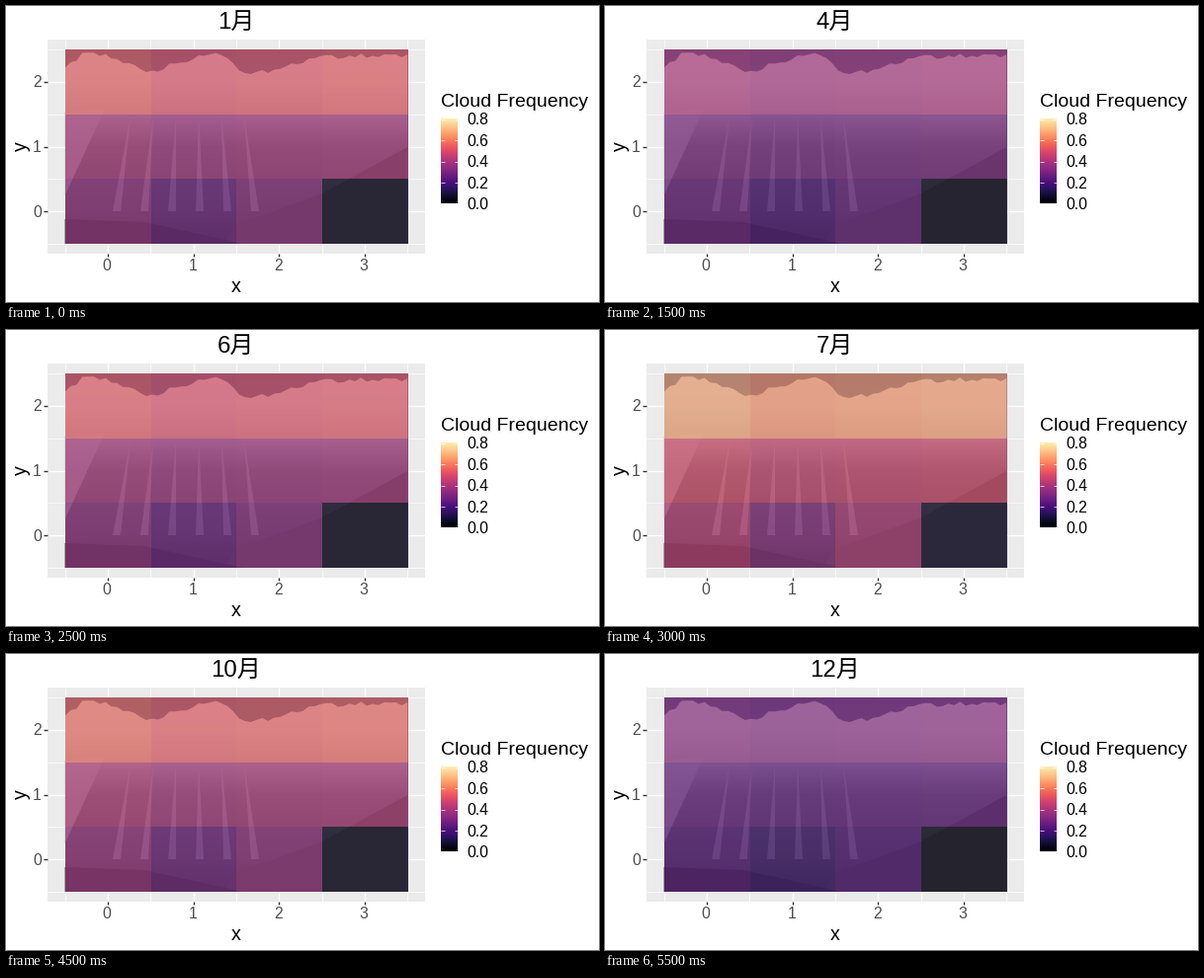
These frames come from a looping animation (600 px wide and 300 px high, 6000 ms). A matplotlib script:

```python
import numpy as np
import matplotlib.pyplot as plt
from matplotlib.animation import FuncAnimation
from matplotlib.colors import LinearSegmentedColormap
from matplotlib.patches import Polygon, Rectangle

W, H, DPI = 600, 300, 100
plt.rcParams["font.family"] = ["Liberation Sans", "Noto Sans CJK JP"]

LEFT, RIGHT, TOP, BOTTOM = 59.6, 406.2, 44, 241
EXTENT = (LEFT, RIGHT, BOTTOM, TOP)
CELL_W, CELL_H = (RIGHT - LEFT) / 4, (BOTTOM - TOP) / 3

# Each month's cloudiness (percent of the scale), spread by terrain:
# peaks gather cloud, the lower right corner stays clear.
MONTHLY = [47, 26, 40, 35, 24, 46, 58, 50, 53, 49, 40, 29]
TERRAIN = np.outer([1.36, 1, 0.87], [1.03, 0.97, 0.99, 1.01])
TERRAIN[2, 3] = 0.15
TERRAIN[2, 1] = 0.68


def gradient(ax, colors, zorder):
    cmap = LinearSegmentedColormap.from_list("tones", colors)
    ramp = np.linspace(0, 1, 200)[:, None]
    return ax.imshow(ramp, cmap=cmap, extent=EXTENT, zorder=zorder)


def line(ax, xs, ys, color, px, zorder=1):
    ax.plot(xs, ys, color=color, lw=px * 72 / DPI, zorder=zorder,
            solid_capstyle="butt")


def label(ax, x, y, text, px, color="black", **kwargs):
    return ax.text(x, y, text, fontsize=px * 72 / DPI, color=color, **kwargs)


def shape(ax, points, color, alpha=1.0):
    patch = Polygon(points, facecolor=color, edgecolor="none", alpha=alpha,
                    zorder=5)
    ax.add_patch(patch)
    return patch


def skyline():
    """Ridge through the main summits, roughened between them."""
    peaks_x = [LEFT, 82, 107, 147, 172, 217, 238, 268, 318, RIGHT]
    peaks_y = [60, 46, 51, 66, 57, 46, 67, 65, 51, 49]
    x = np.linspace(LEFT, RIGHT, 60)
    jitter = np.random.default_rng(4).uniform(-2, 3, x.size)
    return list(zip(x, np.interp(x, peaks_x, peaks_y) + jitter))


def draw_mountains(ax):
    gradient(ax, ["#4b5570", "#686f82"], 3)
    mountain = shape(ax, skyline() + [(RIGHT, BOTTOM), (LEFT, BOTTOM)],
                     "none")
    slope = gradient(ax, ["#c2bfc4", "#bfbcc0", "#aaa6aa", "#777377",
                          "#686569", "#5f5c5e", "#4b4947"], 4)
    slope.set_clip_path(mountain)

    shape(ax, [(LEFT, 108), (100, 104), (LEFT, 192)], "#b5b1b5", 0.7)
    for i in range(6):
        top, foot = 126 + 23 * i, 112 + 28 * i
        shape(ax, [(top, 112), (foot + 4, 208), (foot - 4, 208)],
              "#c2bfc4", 0.45)
    shape(ax, [(233, 222), (320, 190), (RIGHT, 143), (RIGHT, BOTTOM),
               (220, BOTTOM)], "#565350")
    shape(ax, [(LEFT, 216), (140, 219), (240, BOTTOM), (LEFT, BOTTOM)],
          "#423f3d")


def draw_panel(ax):
    ax.add_patch(Rectangle((42, 34), 382, 216.5, color="#ebebeb", lw=0))
    for i in range(9):
        x = LEFT + i * CELL_W / 2
        line(ax, [x, x], [34, 250.5], "white", 1.4 if i % 2 else 0.7)
    for i in range(7):
        y = BOTTOM - i * CELL_H / 2
        line(ax, [42, 424], [y, y], "white", 1.4 if i % 2 else 0.7)
    for i in range(4):
        x = LEFT + (i + 0.5) * CELL_W
        line(ax, [x, x], [250.5, 254.2], "#333333", 1.4)
        label(ax, x - 0.8, 268, str(i), 15.7, "#4d4d4d", ha="center")
    for i in range(3):
        y = BOTTOM - (i + 0.5) * CELL_H
        line(ax, [38.3, 42], [y, y], "#333333", 1.4)
        label(ax, 36, y + 5.6, str(i), 15.7, "#4d4d4d", ha="right")
    label(ax, 232.8, 290, "x", 19.6, ha="center")
    label(ax, 24.5, 142, "y", 19.6, rotation=90, ha="right", va="center")


def draw_legend(ax):
    top, bottom = 114.5, 200.5
    label(ax, 439.6, 102, "Cloud Frequency", 19.5)
    ax.imshow(np.linspace(0.97, 0, 256)[:, None], cmap="magma", vmin=0,
              vmax=1, extent=(440, 457, bottom, top), zorder=3)
    for i in range(5):
        y = bottom - i * (bottom - top) / 4
        line(ax, [440, 443.5], [y, y], "white", 0.7, 4)
        line(ax, [453.5, 457], [y, y], "white", 0.7, 4)
        label(ax, 466.8, y + 5.6, f"{i * 0.2:.1f}", 15.7)


fig = plt.figure(figsize=(W / DPI, H / DPI), dpi=DPI, facecolor="white")
ax = fig.add_axes([0, 0, 1, 1])
ax.axis("off")

draw_panel(ax)
draw_mountains(ax)
draw_legend(ax)
tiles = ax.imshow(TERRAIN, cmap="magma", vmin=0, vmax=100, alpha=0.6,
                  extent=EXTENT, interpolation="nearest", zorder=6)
title = label(ax, 232.4, 23, "", 24, ha="center")
ax.set(xlim=(0, W), ylim=(H, 0), aspect="auto")


def update(month):
    tiles.set_data(MONTHLY[month] * TERRAIN)
    title.set_text(f"{month + 1}月")
    return tiles, title


anim = FuncAnimation(fig, update, frames=len(MONTHLY), interval=500,
                     repeat=True, repeat_delay=0)
plt.show()
```
